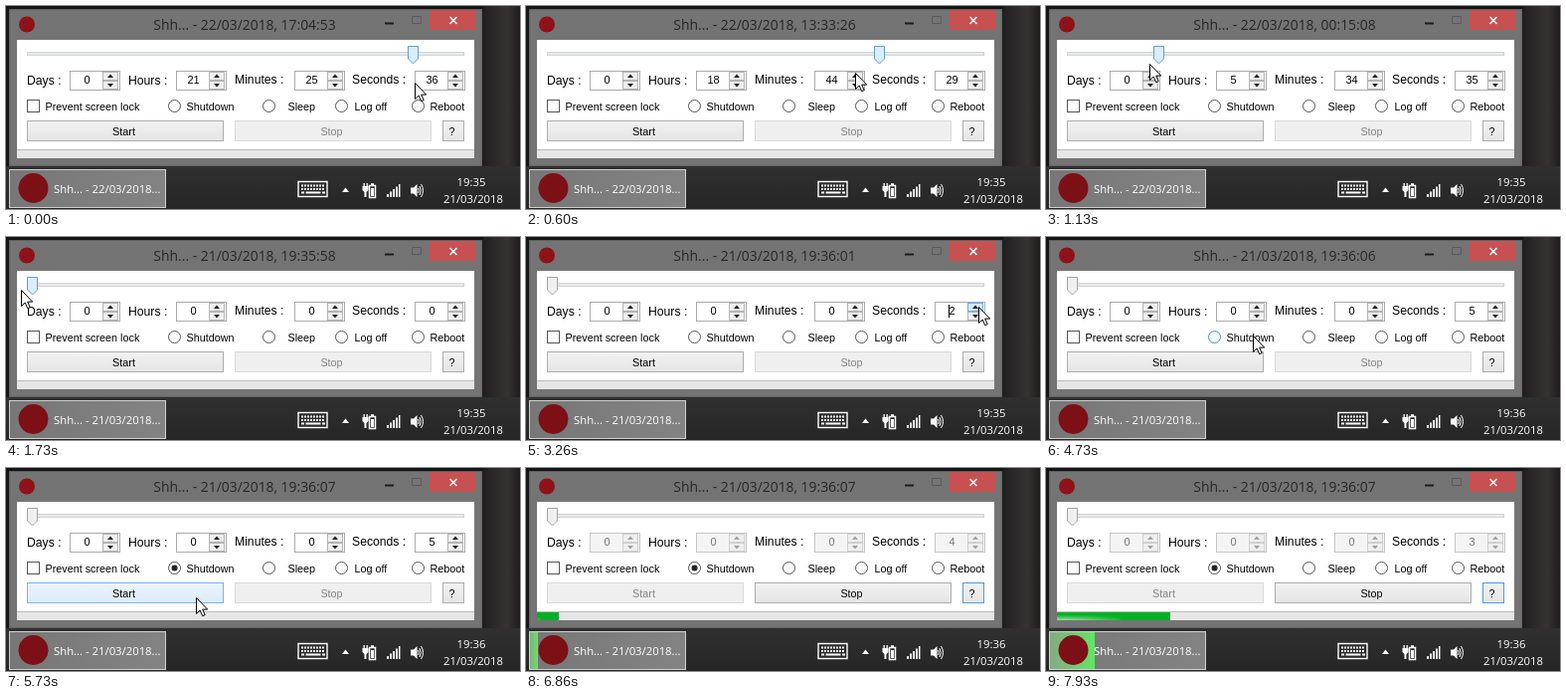
An HTML page that plays this animation: 517 px wide and 204 px high, repeating every 8 s.

```html
<!DOCTYPE html>
<html lang="en">
<head>
<meta charset="utf-8">
<title>Sleep timer</title>
<style>
  html, body { margin: 0; width: 100%; height: 100%; overflow: hidden; background: #1a1a1a; }
  svg { display: block; width: 517px; height: 204px; }
  text { font: 10.8px "Liberation Sans", Arial, sans-serif; fill: #000; }
  .mid { text-anchor: middle; }
  .title { font: 13.9px "Open Sans", "Noto Sans", sans-serif; fill: #262626; }
  .bar { font: 11.3px "Open Sans", "Noto Sans", sans-serif; fill: #fff; }
  .label { font-size: 12.2px; }
  .field text { font-size: 11px; }
  .box { fill: #fff; stroke: #ababab; }
  .spin { fill: #efefef; stroke: #b4b4b4; }
  .arrow { fill: #222; }
  .spin.hot { fill: #d3e8fb; stroke: #6fade6; }
  .off .box { fill: #f4f4f4; stroke: #c6c6c6; }
  .off .spin { stroke: #d0d0d0; }
  .off .arrow { fill: #a0a0a0; }
  .off text { fill: #777; }
  .ring { fill: #fff; stroke: #555; }
  .ring.hot { fill: #f1f8ff; stroke: #3d97e3; }
  .ring.down { fill: #d5eafc; stroke: #2f7fc8; }
  .btn rect { fill: url(#face); stroke: #acacac; }
  .btn.hot rect { fill: url(#hot); stroke: #7eb4ea; }
  .btn.down rect { fill: #c8e1f8; stroke: #569de5; }
  .btn.focus rect { stroke: #4a9be8; }
  .btn.dim rect { fill: #efefef; stroke: #d9d9d9; }
  .btn.dim text { fill: #838383; }
  #thumb { fill: #f0f0f0; stroke: #a3a3a3; }
  #thumb.hot { fill: #d9edfb; stroke: #5f9fd2; }
</style>
</head>
<body>
<svg viewBox="0 0 517 204">
  <defs>
    <linearGradient id="desk">
      <stop stop-color="#161616"/><stop offset=".92" stop-color="#1c1b1b"/>
      <stop offset=".975" stop-color="#363333"/><stop offset="1" stop-color="#1e1c1c"/>
    </linearGradient>
    <linearGradient id="task" x2="0" y2="1"><stop stop-color="#303030"/><stop offset="1" stop-color="#262626"/></linearGradient>
    <linearGradient id="tab"><stop stop-color="#777"/><stop offset="1" stop-color="#838383"/></linearGradient>
    <linearGradient id="tabGreen"><stop stop-color="#86a886"/><stop offset="1" stop-color="#62e662"/></linearGradient>
    <linearGradient id="face" x2="0" y2="1"><stop stop-color="#f1f1f1"/><stop offset="1" stop-color="#e5e5e5"/></linearGradient>
    <linearGradient id="hot" x2="0" y2="1"><stop stop-color="#ecf5fd"/><stop offset="1" stop-color="#dbecfc"/></linearGradient>
    <radialGradient id="shine" cy="1" r=".6"><stop stop-color="#fff" stop-opacity=".6"/><stop offset="1" stop-color="#fff" stop-opacity="0"/></radialGradient>
    <clipPath id="fillClip"><rect id="clip" x="11" y="145" width="0" height="8"/></clipPath>
  </defs>

  <rect width="517" height="204" fill="url(#desk)"/>
  <rect width="480" height="3" fill="#141414"/>
  <rect y="161" width="517" height="43" fill="url(#task)"/>

  <!-- window -->
  <rect x="3.5" y="3.500" width="475" height="157" fill="#747474" stroke="#626262"/>
  <circle cx="21" cy="18.500" r="8" fill="#8e1218"/>
  <text id="title" class="title mid" x="240" y="24"/>
  <path d="M381 17.500h9" stroke="#1c1c1c" stroke-width="2"/>
  <path d="M408.500 10.500h9v7h-9z" fill="none" stroke="#5a5a5a"/>
  <rect x="426" y="4" width="46" height="20" fill="#c75050"/>
  <path d="M446.500 11l7 7m0-7l-7 7" stroke="#fff" stroke-width="1.600"/>
  <rect x="11" y="34" width="460" height="119" fill="#fff"/>
  <rect x="11" y="144" width="460" height="9" fill="#e6e6e6"/>
  <path d="M11 144.500h460" stroke="#bcbcbc"/>
  <g clip-path="url(#fillClip)">
    <rect x="11" y="145" width="460" height="8" fill="#06b025"/>
    <rect id="glow" y="144" width="120" height="9" fill="url(#shine)"/>
  </g>

  <!-- slider -->
  <rect x="21.500" y="46.500" width="439" height="3" fill="#e7eaea" stroke="#d3d3d3"/>
  <path id="thumb" d="M-5 40.500h10v12.500l-5 5l-5-5z"/>

  <g id="form"></g>

  <!-- taskbar -->
  <rect x="3.500" y="164.500" width="157" height="38" fill="url(#tab)"/>
  <rect id="tabFill" x="3" y="164" width="0" height="39" fill="url(#tabGreen)"/>
  <rect x="3.500" y="164.500" width="157" height="38" fill="none" stroke="#d0d0d0"/>
  <circle cx="27.500" cy="183" r="15" fill="#7d1016"/>
  <text id="tabText" class="bar" x="48" y="188"/>
  <text id="clock" class="bar mid" x="468" y="181"/>
  <text class="bar mid" x="470" y="198">21/03/2018</text>
  <g fill="#fff">
    <rect x="294" y="176.500" width="29" height="15" fill="none" stroke="#fff" stroke-width="1.400"/>
    <path d="M297 180.500h24M297 184h24" stroke="#fff" stroke-width="2" stroke-dasharray="2 1"/>
    <path d="M297 187.500h3m1.500 0h15m1.500 0h3" stroke="#fff" stroke-width="2"/>
    <path d="M338 187l3.500-4.500l3.500 4.500z"/>
    <path d="M365.500 180.500h6v12h-6z M367 179h3" fill="none" stroke="#fff" stroke-width="1.500"/>
    <path d="M367 183h3v8h-3z M358.500 181h6v4l-2 2v5h-2v-5l-2-2z M359.500 178h1.300v3h-1.300z M362.500 178h1.300v3h-1.300z"/>
    <path d="M383 189h2v3h-2z M386 186.500h2v5.500h-2z M389 184h2v8h-2z M392 181.500h2v10.500h-2z M395 179h1.500v13h-1.500z"/>
    <path d="M407 182.500h3l3.500-3.500v13l-3.500-3.500h-3z"/>
    <path d="M414.500 183q1.500 2.500 0 5M416 181q2.500 4.500 0 9M417.500 179q4 6.500 0 13" fill="none" stroke="#fff"/>
  </g>

  <path id="cursor" d="M.5.5v16l3.700-3.500l2.500 5.700l2.500-1.100l-2.500-5.500h5z" fill="#fff" stroke="#000"/>
</svg>

<script>
const $ = id => document.getElementById(id);
const LOOP = 8000, DAY = 86400, APP = 'Shh...';

// Static form controls
const field = (id, label, lx, ly, x) => `
  <text class="label" x="${lx}" y="${ly}">${label} :</text>
  <g id="${id}" class="field">
    <rect class="box" x="${x + .5}" y="65.5" width="50" height="19"/>
    <text class="mid" x="${x + 17.5}" y="78"></text>
    <rect class="spin" x="${x + 33.5}" y="66.5" width="15" height="8"/>
    <rect class="spin" x="${x + 33.5}" y="75.5" width="15" height="8"/>
    <path class="arrow" d="M${x + 38} 72l3-3.500l3 3.500zM${x + 38} 78l3 3.500l3-3.500z"/>
  </g>`;
const radio = (id, label, cx, tx) => `
  <circle id="${id}" class="ring" cx="${cx}" cy="100.5" r="6"/>
  <text x="${tx}" y="104.500">${label}</text>`;
const button = (id, label, x, w) => `
  <g id="${id}" class="btn">
    <rect x="${x + .5}" y="115.5" width="${w}" height="20"/>
    <text class="mid" x="${x + w / 2 - 1}" y="129.500">${label}</text>
  </g>`;

$('form').innerHTML =
  field('days', 'Days', 21, 79, 64) +
  field('hours', 'Hours', 123, 79, 171) +
  field('minutes', 'Minutes', 230, 78, 290) +
  field('seconds', 'Seconds', 348, 78, 411) +
  '<path id="caret" d="M425.500 68v13" stroke="#000"/>' +
  '<rect class="ring" x="21.5" y="94.500" width="12" height="12"/>' +
  '<text x="39.500" y="104.500">Prevent screen lock</text>' +
  radio('shutdown', 'Shutdown', 169.5, 181.5) +
  radio('sleep', 'Sleep', 264.5, 283.5) +
  radio('logoff', 'Log off', 337.5, 350.5) +
  radio('reboot', 'Reboot', 414.5, 426.5) +
  '<circle id="dot" cx="169.500" cy="100.500" r="3" fill="#222"/>' +
  button('start', 'Start', 21, 197) +
  button('stop', 'Stop', 230, 197) +
  button('help', '?', 439, 21);

// Motion tracks: [ms, value, ...]
const pointer = [[0, 411, 77], [260, 477, 76], [330, 477, 74], [600, 331, 67], [860, 190, 62],
  [1400, 17, 54], [1730, 15, 53], [1900, 15, 53], [2350, 270, 81], [2730, 454, 71], [3260, 455, 70],
  [3860, 455, 71], [4660, 208, 99], [5150, 208, 99], [5730, 191, 130]];
const thumbX = [[0, 409], [260, 456], [330, 456], [600, 355], [860, 200], [1400, 26]];
const titleValue = [[0, 77336], [260, 86399], [330, 86399], [600, 64649], [860, 33500], [1400, 0]];
const fieldValue = [[0, 77136], [320, 86399], [370, 86399], [600, 67469], [860, 36500], [1460, 0]];
const clockTicks = [1000, 2400, 3600, 4600, 5500];
const clicks = [2930, 3190, 3460, 3660, 3860];
const countdown = [6600, 7390];

function sample(track, t, i = 1) {
  const n = track.findIndex(p => p[0] > t);
  if (n < 0) return track[track.length - 1][i];
  const a = track[n - 1], b = track[n];
  return a[i] + (b[i] - a[i]) * (t - a[0]) / (b[0] - a[0]);
}
const passed = (times, t) => times.filter(x => t >= x).length;
const pad = n => String(n).padStart(2, '0');
const split = s => [Math.floor(s / DAY), Math.floor(s / 3600) % 24, Math.floor(s / 60) % 60, s % 60];
const setClass = (id, base, extra) => $(id).setAttribute('class', base + ' ' + extra);
const show = (id, on) => $(id).setAttribute('visibility', on ? 'visible' : 'hidden');

function draw(t) {
  const now = 19 * 3600 + 35 * 60 + 57 + passed(clockTicks, t);
  const added = passed(clicks, t);
  const running = t >= 6120;

  const [d, h, m, s] = split(now + Math.round(sample(titleValue, t)) + added);
  const date = `${21 + d}/03/2018`;
  $('title').textContent = `${APP} - ${date}, ${pad(h)}:${pad(m)}:${pad(s)}`;
  $('tabText').textContent = `${APP} - ${date}...`;
  const wall = split(now);
  $('clock').textContent = `${wall[1]}:${pad(wall[2])}`;

  const left = Math.round(sample(fieldValue, t)) + added - passed(countdown, t);
  split(left).forEach((v, i) => {
    const id = ['days', 'hours', 'minutes', 'seconds'][i];
    $(id).querySelector('text').textContent = v;
    setClass(id, 'field', running ? 'off' : '');
  });
  const onSpin = t >= 2660 && t < 3920;
  $('seconds').querySelector('.spin').setAttribute('class', onSpin ? 'spin hot' : 'spin');
  show('caret', t >= 2920 && t < 3920);

  $('thumb').setAttribute('transform', `translate(${Math.round(sample(thumbX, t)) + .5})`);
  setClass('thumb', '', t < 1920 ? 'hot' : '');

  setClass('shutdown', 'ring', t < 4590 || t >= 5320 ? '' : t >= 4860 && t < 4990 ? 'down' : 'hot');
  show('dot', t >= 4990);

  setClass('start', 'btn', running ? 'dim' : t >= 5990 ? 'down' : t >= 5520 ? 'hot' : '');
  setClass('stop', 'btn', running ? '' : 'dim');
  setClass('help', 'btn', running ? 'focus' : '');

  const done = Math.max(0, t - 6600) / 1330;
  $('clip').setAttribute('width', Math.round(114 * done));
  $('tabFill').setAttribute('width', Math.round(46 * done));
  $('glow').setAttribute('x', -120 + 75 * done);

  const x = Math.round(sample(pointer, t)), y = Math.round(sample(pointer, t, 2));
  $('cursor').setAttribute('transform', `translate(${x} ${y})`);
  show('cursor', t < 6260);
}

function tick() {
  const t = performance.now() % LOOP;
  const step = Math.floor((Math.floor(t / 10) * 10 + 9.99) * .015);
  draw(Math.floor(step / .15 + 1e-6) * 10);
  requestAnimationFrame(tick);
}
tick();
</script>
</body>
</html>
```
